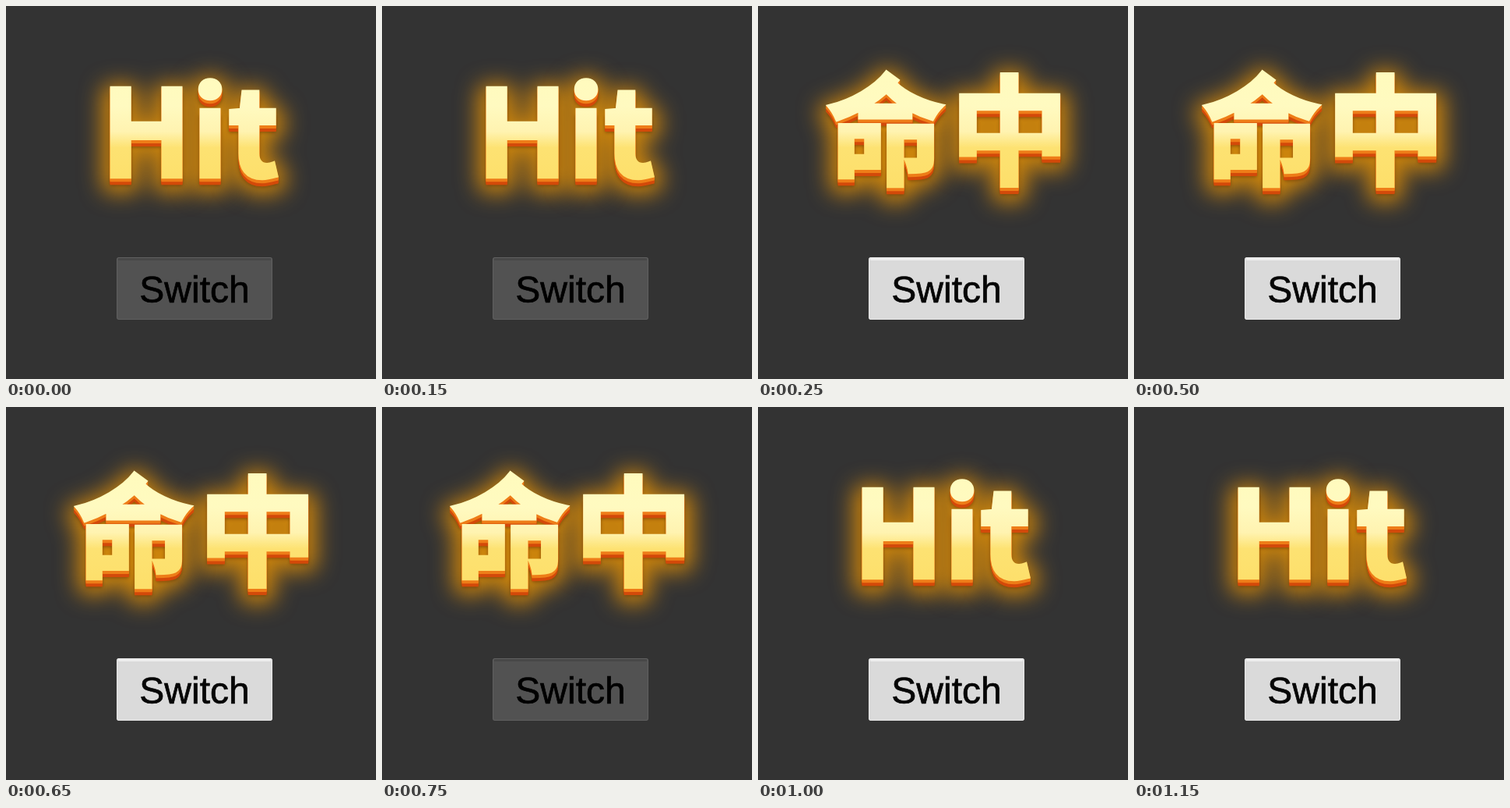
Recreate the animation shown at these times as an HTML page with a canvas. Size 475x478 px, loop 1250 ms.

```html
<!DOCTYPE html>
<html lang="zh">
<head>
<meta charset="utf-8">
<style>
html, body { margin: 0; width: 100%; height: 100%; overflow: hidden; background: #333; }
canvas { display: block; }
</style>
</head>
<body>
<canvas id="stage" width="475" height="478"></canvas>
<script>
const ctx = document.getElementById('stage').getContext('2d');
const STEP = 250, LOOP = 1250, DEPTH = 8, WEIGHT = 4.4, FAR = 1000;

const hit = { text: 'Hit', size: 154, gap: '0px', mid: 242, base: 219 };
const hitZh = { text: '命中', size: 152, gap: '7px', mid: 238, base: 217 };
const steps = [
  { title: hit, pressed: true },
  { title: hitZh, pressed: false },
  { title: hitZh, pressed: false },
  { title: hitZh, pressed: true },
  { title: hit, pressed: false }
];

function gradient(y0, y1, stops) {
  const g = ctx.createLinearGradient(0, y0, 0, y1);
  stops.forEach(([at, color]) => g.addColorStop(at, color));
  return g;
}

// Draws only the blurred shadow of the thickened text.
function blurred(color, blur, width, put, dy) {
  ctx.save();
  ctx.shadowColor = color;
  ctx.shadowBlur = blur;
  ctx.shadowOffsetX = FAR;
  ctx.strokeStyle = '#000';
  ctx.lineWidth = width;
  ctx.lineJoin = 'round';
  put('strokeText', dy, -FAR);
  ctx.restore();
}

function drawTitle({ text, size, gap, mid, base }) {
  ctx.save();
  ctx.font = `900 ${size}px "Noto Sans CJK SC", "Noto Sans CJK", sans-serif`;
  ctx.letterSpacing = gap;
  ctx.textAlign = 'left';
  ctx.lineWidth = WEIGHT;
  ctx.lineJoin = 'miter';
  ctx.miterLimit = 3;
  const box = ctx.measureText(text);
  const x = mid - (box.actualBoundingBoxRight - box.actualBoundingBoxLeft) / 2;
  const put = (draw, dy, dx = 0) => ctx[draw](text, x + dx, base + dy);
  const solid = (paint, dy) => {
    ctx.fillStyle = ctx.strokeStyle = paint;
    put('fillText', dy);
    put('strokeText', dy);
  };

  blurred('rgba(255,160,0,.75)', 28, 26, put, 8);
  blurred('rgba(90,40,0,.6)', 4, WEIGHT, put, DEPTH + 1);
  for (let d = DEPTH; d > 0; d--) solid(d > 4 ? '#d34a0a' : '#ee7d18', d);
  solid(gradient(84, 232, [
    [0, '#fffbbd'], [0.3, '#fffac0'], [0.52, '#fff3b0'],
    [0.66, '#fde272'], [1, '#fddf6a']
  ]), 0);
  ctx.restore();
}

function drawButton(pressed) {
  ctx.beginPath();
  ctx.roundRect(142, 322, 200, 80, 3);
  ctx.fillStyle = pressed ? '#525252' : '#dadada';
  ctx.fill();
  ctx.fillStyle = pressed ? '#484848' : '#eeeeee';
  ctx.fillRect(144, 323, 196, 3);
  ctx.beginPath();
  ctx.roundRect(142.5, 322.5, 199, 79, 2.5);
  ctx.strokeStyle = pressed ? '#606060' : '#e8e8e8';
  ctx.lineWidth = 1;
  ctx.stroke();

  ctx.font = '48px "Liberation Sans", Arial, sans-serif';
  ctx.textAlign = 'center';
  ctx.fillStyle = ctx.strokeStyle = pressed ? '#000' : '#060606';
  ctx.lineWidth = 0.7;
  ctx.fillText('Switch', 242, 380);
  ctx.strokeText('Switch', 242, 380);
}

function frame(now) {
  const { title, pressed } = steps[Math.floor((now % LOOP) / STEP)];
  ctx.fillStyle = '#333';
  ctx.fillRect(0, 0, 475, 478);
  drawTitle(title);
  drawButton(pressed);
  requestAnimationFrame(frame);
}
requestAnimationFrame(frame);
</script>
</body>
</html>
```
